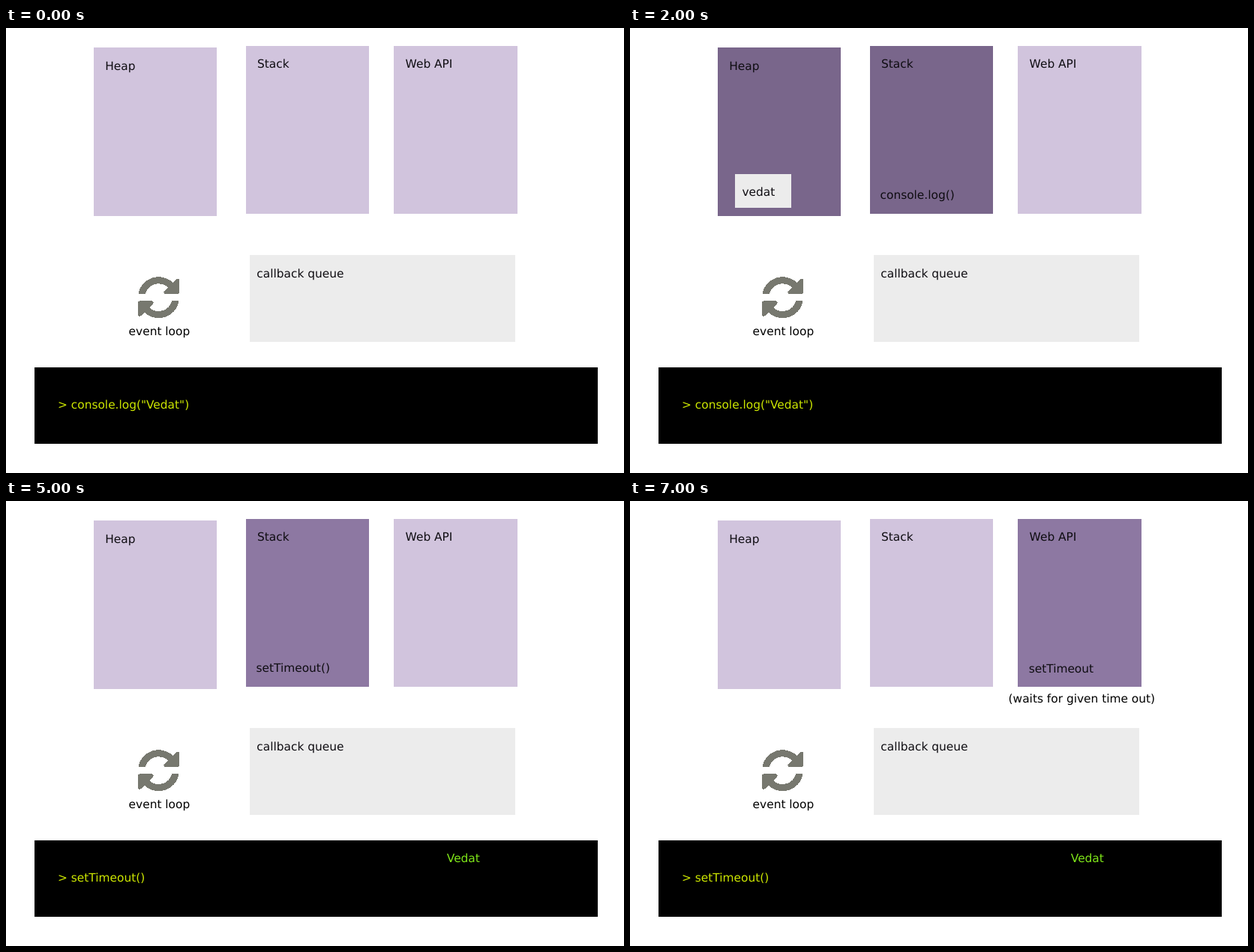
Recreate the animation shown at these times as an HTML page. Size 824 by 594 pixels, loop 8000 ms.

```html
<!DOCTYPE html>
<html lang="en">
<head>
<meta charset="utf-8">
<title>Event loop</title>
<style>
  html, body { margin: 0; width: 100%; height: 100%; overflow: hidden; background: #fff; }
  svg { display: block; width: 824px; height: 594px; }
  text { font: 15.4px "DejaVu Sans", sans-serif; fill: #0f0d12; white-space: pre; text-rendering: geometricPrecision; }
  .plain { fill: #000; }
  .input { fill: #cce600; }
  .output { fill: #7fe619; }
</style>
</head>
<body>
<svg viewBox="0 0 824 594">
  <defs>
    <path id="arrow" d="M-26.8-6.2A27.5 27.5 0 0 1 18.9-19.9L23.6-24.5Q25.2-25.9 26.8-24.5Q27.5-23.8 27.5-22.9V-6.9Q27.5-4.6 25.2-4.6H9.2Q6.9-4.6 6.9-6.9Q6.9-7.7 7.6-8.5L12.5-13.4A18.3 18.3 0 0 0-15.6-9.6Q-16-9-17.5-5.4Q-17.8-4.6-18.6-4.6H-25.7Q-26.9-4.6-26.8-6.2Z"/>
  </defs>

  <rect id="heap" x="117" y="26" width="164" height="225"/>
  <rect id="stack" x="320" y="24" width="164" height="224"/>
  <rect id="web" x="517" y="24" width="165" height="224"/>
  <text x="132.3" y="56">Heap</text>
  <text x="335" y="53">Stack</text>
  <text x="532.6" y="53">Web API</text>

  <g id="value">
    <rect x="140" y="195" width="75" height="45" fill="#ececec"/>
    <text x="149.4" y="224">vedat</text>
  </g>
  <text id="call" x="333.5" y="228"></text>
  <text id="timer" x="531.7" y="229">setTimeout</text>
  <text id="wait" class="plain" x="504.6" y="269">(waits for given time out)</text>

  <rect x="325" y="303" width="354" height="116" fill="#ececec"/>
  <text x="334.3" y="333">callback queue</text>

  <g transform="translate(203.5 359.7)" fill="#77786f" shape-rendering="crispEdges">
    <use href="#arrow"/>
    <use href="#arrow" transform="rotate(180)"/>
  </g>
  <text class="plain" x="163.6" y="410">event loop</text>

  <rect x="38" y="453" width="751" height="102"/>
  <text id="input" class="input" x="69" y="508"></text>
  <text id="output" class="output" x="587.8" y="482.4">Vedat</text>
</svg>
<script>
  const LOOP = 8000;
  const IDLE = '#d1c4dd', LOG = '#79668b', TIMEOUT = '#8d78a2';
  const el = id => document.getElementById(id);
  const show = (id, on) => el(id).setAttribute('visibility', on ? 'visible' : 'hidden');
  const fill = (id, color) => el(id).setAttribute('fill', color);
  const write = (id, text) => {
    if (el(id).textContent !== text) el(id).textContent = text;
  };

  function draw(ms) {
    const t = ms % LOOP;
    const within = (from, to) => t >= from && t < to;
    const logging = within(1000, 4000);
    const stored = within(2000, 4000);
    const calling = within(5000, 7000);
    const timing = t >= 6000;

    fill('heap', stored ? LOG : IDLE);
    fill('stack', logging ? LOG : calling ? TIMEOUT : IDLE);
    fill('web', timing ? TIMEOUT : IDLE);

    show('value', stored);
    show('timer', timing);
    show('wait', t >= 7000);
    show('output', t >= 3000);

    write('call', logging ? 'console.log()' : calling ? 'setTimeout()' : '');
    write('input', t < 4000 ? '> console.log("Vedat")' : '> setTimeout()');
  }

  const start = performance.now();
  function tick() {
    draw(performance.now() - start);
    requestAnimationFrame(tick);
  }
  tick();
</script>
</body>
</html>
```
